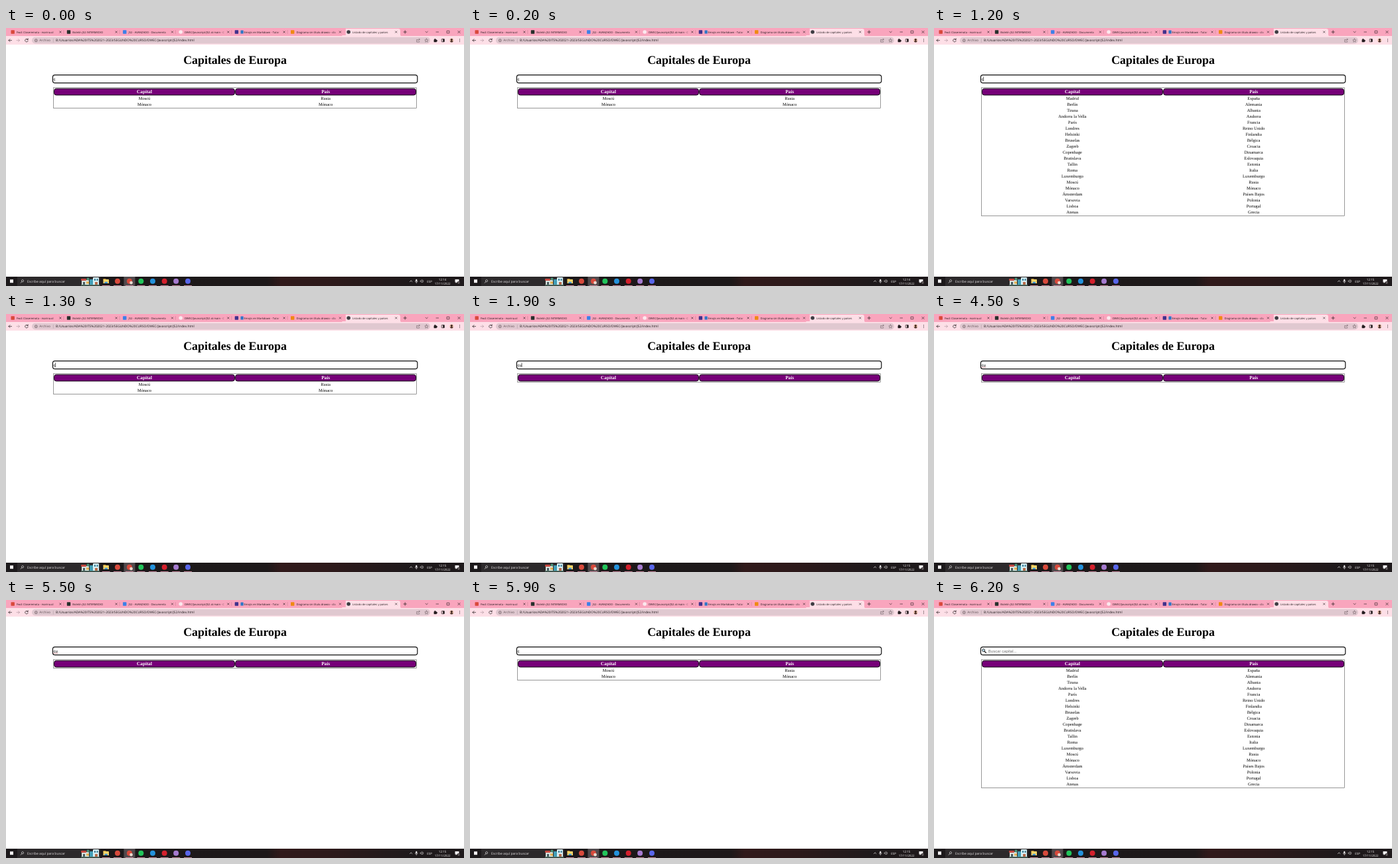
Animation, 690 px wide and 388 px high, one loop 6.4 s. Source, as an HTML page:

```html
<!DOCTYPE html>
<html lang="es">
<head>
<meta charset="utf-8">
<title>Capitales de Europa</title>
<style>
  html, body { margin: 0; width: 100%; height: 100%; overflow: hidden; background: #fff; }
  svg { display: block; width: 690px; height: 388px; text-rendering: geometricPrecision; }
  .ui { font-family: "Open Sans", "Noto Sans", sans-serif; }
  .serif { font-family: "Liberation Serif", "Times New Roman", serif; text-anchor: middle; }
  .field { font: 6px "Liberation Sans", Arial, sans-serif; }
  .line { fill: none; stroke-linecap: round; stroke-linejoin: round; }
</style>
</head>
<body>
<svg id="stage" viewBox="0 0 690 388" xmlns="http://www.w3.org/2000/svg"></svg>
<script>
const LOOP = 6400;
const STRIP = '#f9a5bd', BAR = '#fddfe7', PILL = '#e0c8d0', INK = '#21191c';

const rect = (x, y, w, h, fill, r = 0, more = '') =>
  `<rect x="${x}" y="${y}" width="${w}" height="${h}" rx="${r}" fill="${fill}" ${more}/>`;
const dot = (x, y, r, fill, more = '') => `<circle cx="${x}" cy="${y}" r="${r}" fill="${fill}" ${more}/>`;
const line = (d, color = INK, w = .7) => `<path class="line" d="${d}" stroke="${color}" stroke-width="${w}"/>`;
const text = (x, y, size, str, fill = INK, more = 'class="ui"') =>
  `<text x="${x}" y="${y}" font-size="${size}" fill="${fill}" ${more}>${str}</text>`;
const cross = (x, y, r, w) => line(`M${x - r} ${y - r}l${2 * r} ${2 * r}m0 ${-2 * r}l${-2 * r} ${2 * r}`, INK, w);

const tabs = [
  ['Fwd: Claseremota - marina.ol', '#d9483b'],
  ['Boletín JS2 INTERMEDIO', '#27302c'],
  ['JS2 - AVANZADO - Documento', '#3b80e8'],
  ['DWEC/Javascript/JS2 at main · C', '#fbe9ee'],
  ['Emojis en Markdown - Tutor', '#41318c'],
  ['Diagrama sin título.drawio - dia', '#ef8a12'],
  ['Listado de capitales y países', '#3c3c42']
];

function tab([name, color], i) {
  const x = 7.3 + 84.3 * i, last = i === tabs.length - 1, round = i === 3 || last;
  const icon = round ? dot(x + 3, 6, 2.8, color) : rect(x + .2, 3.3, 5.4, 5.4, color, .6);
  const extra = i === 4 ? rect(x + 9, 3.4, 4.2, 5.2, '#2d78c8', .6) : '';
  const fade = last ? '' : rect(x + 63, 1, 9, 10, 'url(#fade)') + rect(x + 72, 1, 11, 10, STRIP);
  const edge = i < 5 ? line(`M${x + 79.5} 3.5v5`, '#b87186', .4) : '';
  return icon + extra + text(x + (i === 4 ? 14 : 8.7), 7.6, 4.1, name) + fade + edge + cross(x + 74.6, 6, 1.2, .6);
}

function browser() {
  return rect(0, 0, 690, 13, STRIP) +
    `<path d="M504 12.5q3 0 3-3V4q0-3 3-3h81q3 0 3 3v5.5q0 3 3 3z" fill="${BAR}"/>` +
    rect(0, 12, 690, 13, BAR) + rect(39, 13.7, 600, 9.8, PILL, 4.9) +
    tabs.map(tab).join('') +
    line('M599 6h4.4m-2.2-2.2v4.4') +
    line('M632 5.2l1.7 1.7 1.7-1.7M648 6h3.6M664.5 4.3h3.4v3.4h-3.4z', INK, .6) + cross(682.5, 6, 1.7, .6) +
    // toolbar
    line('M8.5 18.6h-4.5m2-2l-2 2 2 2') + line('M16 18.6h4.5m-2-2l2 2-2 2', '#b59aa3') +
    line('M32.8 17.2a2.3 2.3 0 1 0 .4 2.2M33.2 15.9v1.7h-1.7') +
    dot(45.3, 18.7, 2, 'none', 'stroke="#56474c" stroke-width=".6"') + line('M45.3 18.5v1.1m0-1.9v.1', '#56474c', .5) +
    text(50.3, 20.4, 4.8, 'Archivo', '#5f5056') + line('M71.3 16.3v5', '#a08e95', .4) +
    text(75, 20.4, 4.8, 'B:/Usuarios/ADA%20ITS%202021-2023/SEGUNDO%20CURSO/DWEC/Javascript/JS2/index.html') +
    line('M620.3 17.5h-1.6v3.6h4v-1.2M620.5 19q.4-1.9 2.8-1.9m-1.2-1.1l1.2 1.1-1.2 1.1', '#56474c', .5) +
    line('M633.5 16l.8 1.8 1.9.2-1.4 1.3.4 1.9-1.7-1-1.7 1 .4-1.9-1.4-1.3 1.9-.2z', '#56474c', .5) +
    // extensions, side panel, profile, menu
    rect(644.6, 17.2, 4.2, 4, INK, .5) + dot(646.4, 16.9, 1, INK) + dot(649, 19.2, 1, INK) +
    rect(656.2, 16.6, 4.2, 4.2, 'none', .4, `stroke="${INK}" stroke-width=".7"`) + rect(658.2, 16.6, 2.2, 4.2, INK) +
    dot(671.3, 18.6, 3, '#e6b9a5') + dot(671.3, 17.5, 1.5, '#3f2620') +
    '<path d="M668.9 20.4q2.4-3 4.8 0-2.4 2.200-4.800 0z" fill="#3f2620"/>' +
    [16.8, 18.6, 20.4].map(y => dot(683.5, y, .5, INK)).join('');
}

function taskbar() {
  const apps = [[168, '#d84a3c'], [186, '#d84a3c'], [203.4, '#22c55b'], [221, '#2492dc'],
    [238.7, '#d5202c'], [256.2, '#a67bd0'], [274, '#5966ea']];
  const light = '#f4f2f3';
  return rect(0, 374, 690, 14, 'url(#dark)') + rect(17, 374, 125, 14, '#2c292b') +
    rect(6, 378.2, 5, 5, light) +
    dot(25, 380.2, 1.6, 'none', `stroke="${light}" stroke-width=".6"`) + line('M23.9 381.5l-1.7 1.8', light) +
    text(32, 382.8, 5, 'Escribe aquí para buscar', '#e4e0e2') +
    // search illustration
    rect(114, 379, 11, 8, '#d9e3de', .6) + rect(113, 377, 8, 3, '#c84a42', 1) + rect(116, 382, 3, 5, '#4a5d62') +
    rect(121, 381.5, 4, 3, '#e4b04b') + dot(123.5, 377.5, 2, '#499277') + rect(126, 378, 6, 9, '#439fb7', .6) +
    rect(131, 375, 9, 12, '#d7eef2', 1) + rect(133, 377, 2, 3, '#397e98') + rect(136.5, 377, 2, 3, '#397e98') +
    rect(134, 382, 4, 5, '#b76b4a') + rect(113, 386, 28, 1.3, '#54796b') +
    rect(177.5, 374, 17, 14, '#514a4d') +
    rect(146.5, 377.2, 4, 2, '#dfa633', .4) + rect(146.5, 378, 8.5, 6, '#f8d568', .5) + rect(148.5, 381.7, 4.5, 2.3, '#4299d5') +
    apps.map(([x, c]) => dot(x, 380.8, 4, c)).join('') +
    dot(188.6, 383.1, 2.4, '#e9d9cf') +
    [150.7, ...apps.map(a => a[0])].map(x => rect(x - 6, 387.1, 12, .9, '#d995aa')).join('') +
    line('M608.5 381.5l1.7-1.7 1.7 1.7', light) +
    rect(617.3, 377.8, 2, 3.8, light, 1) + line('M616.5 380.5q0 2.2 1.8 2.2t1.8-2.2m-1.8 2.2v1', light, .5) +
    line('M624.5 379.8h1l1.5-1.3v4.4l-1.5-1.3h-1zM628.3 379.2q1.2 1.5 0 3', light, .5) +
    text(634.3, 382.6, 4.5, 'ESP', light) +
    text(657.6, 386.3, 4.5, '17/11/2022', light, 'class="ui" text-anchor="middle"') +
    text(657.6, 379.6, 4.5, '', light, 'class="ui" text-anchor="middle" id="clock"') +
    `<path d="M676.5 378h6v4.5h-3.3l-1.4 1.5v-1.5h-1.3z" fill="${light}"/>` + dot(682.1, 383, 2.2, '#3d3638') +
    text(682.1, 384.3, 3.4, '2', light, 'class="ui" text-anchor="middle"');
}

const serif = (x, y, size, str, fill, bold) =>
  text(x, y, size, str, fill, `class="serif"${bold ? ' font-weight="700"' : ''}`);
const LEFT = 208.5, RIGHT = 481.6;

const places = `Madrid,España;Berlín,Alemania;Tirana,Albania;Andorra la Vella,Andorra;París,Francia;
Londres,Reino Unido;Helsinki,Finlandia;Bruselas,Bélgica;Zagreb,Croacia;Copenhage,Dinamarca;
Bratislava,Eslovaquia;Tallin,Estonia;Roma,Italia;Luxemburgo,Luxemburgo;Moscú,Rusia;Mónaco,Mónaco;
Ámsterdam,Países Bajos;Varsovia,Polonia;Lisboa,Portugal;Atenas,Grecia`
  .split(';').map(p => p.trim().split(','));

function table(query) {
  const rows = places.filter(([capital]) => capital.includes(query));
  const heads = [[LEFT, 'Capital'], [RIGHT, 'País']].map(([x, name]) =>
    rect(x - 135.9, 91.2, 271.8, 9.7, '#760078', 3.2, 'stroke="#120014" stroke-width="1"') +
    serif(x, 98.4, 7.2, name, '#fff', true)).join('');
  return rect(71.5, 89.8, 547, 12.6 + 9 * rows.length, '#fff', 0, 'stroke="#555" stroke-width=".6"') + heads +
    rows.map(([capital, country], i) =>
      serif(LEFT, 108.3 + 9 * i, 6.45, capital, '#000') + serif(RIGHT, 108.3 + 9 * i, 6.45, country, '#000')).join('');
}

function field(value, caret, misspelt) {
  if (!value) return dot(74.6, 75.6, 2, '#b9dcec', 'stroke="#222" stroke-width=".9"') +
    line('M76.2 77.2l2.3 2.4', '#222', 1.3) +
    text(81.8, 78.8, 6, 'Buscar capital...', '#757575', 'class="field"');
  const end = 71.6 + (value === 'c' ? 3 : 6.4);
  return text(71.6, 79, 6, value, '#000', 'class="field"') +
    (misspelt ? line(`M71.8 80.2H${end}`, '#e2434b', .6) : '') +
    (caret ? line(`M${end} 73.6v6.2`, '#000', .6) : '');
}

// [start, typed text, applied filter]
const steps = [[0, 'c', 'c'], [500, '', 'c'], [600, '', ''], [1200, 'c', ''], [1300, 'c', 'c'],
  [1700, 'cu', 'c'], [1800, 'cu', 'cu'], [5900, 'c', 'c'], [6100, '', 'c'], [6200, '', '']];
const blinks = [1200, 2300, 2800, 3400, 3900, 4500, 5000, 5500];

const stage = document.getElementById('stage');
stage.innerHTML = `<defs>
  <linearGradient id="fade"><stop stop-color="${STRIP}" stop-opacity="0"/><stop offset="1" stop-color="${STRIP}"/></linearGradient>
  <linearGradient id="dark"><stop stop-color="#1c191b"/><stop offset=".57" stop-color="#1d1819"/><stop offset=".6" stop-color="#30191a"/><stop offset=".72" stop-color="#2c191a"/><stop offset=".88" stop-color="#1e191b"/></linearGradient>
  </defs>` + rect(0, 0, 690, 388, '#fff') + browser() +
  serif(345, 54.2, 17.9, 'Capitales de Europa', '#000', true) +
  rect(70.4, 70.6, 549.4, 12.1, '#fff', 3.4, 'stroke="#101010" stroke-width="1.2"') +
  '<g id="field"></g><g id="table"></g>' + taskbar();

const put = (id, html) => {
  const el = document.getElementById(id);
  if (el.shown !== html) el.innerHTML = el.shown = html;
};

function draw() {
  const t = performance.now() % LOOP;
  const [, value, query] = steps.findLast(s => s[0] <= t);
  const caret = blinks.filter(b => b <= t).length % 2 === 1;
  put('field', field(value, caret, value === 'cu' && t >= 2000));
  put('table', table(query));
  put('clock', t < 500 ? '12:14' : '12:15');
  requestAnimationFrame(draw);
}
draw();
</script>
</body>
</html>
```
